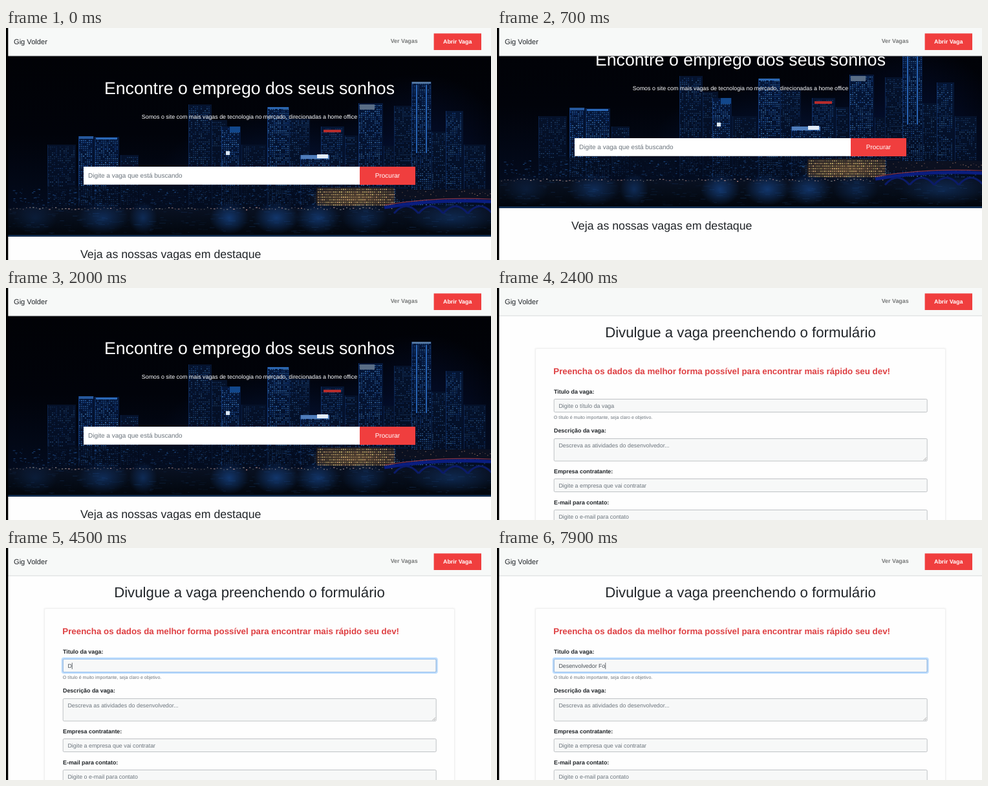
Write an HTML page with a canvas that moves like this. It is 750 px wide and 358 px high and loops after 8 s.

```html
<!DOCTYPE html>
<html lang="pt-BR">
<head>
<meta charset="utf-8">
<title>Vagas</title>
<style>
  html, body { margin: 0; width: 100%; height: 100%; overflow: hidden; background: #fff; }
  #stage { position: relative; width: 750px; height: 358px; overflow: hidden; background: #fefefe; }
  #stage > *, #home > * { position: absolute; left: 0; top: 0; }
  #home { width: 750px; height: 420px; background: #fefefe; }
  #home canvas { left: 3px; top: 43px; }
  svg { display: block; overflow: visible; }
  text {
    font: 8.89px "Liberation Sans", Arial, sans-serif;
    text-rendering: geometricPrecision;
    white-space: pre;
    fill: #212529;
  }
  .b { font-weight: bold; }
  .mid { text-anchor: middle; }
  .white { fill: #fff; }
  .hint { fill: #6c757d; }
  .red { fill: #f03e3e; }
  .field { fill: #f7f8f8; stroke: #bfc2c5; stroke-width: 1; }
</style>
</head>
<body>
<div id="stage">
  <div id="home">
    <canvas id="photo" width="747" height="279"></canvas>
    <svg width="750" height="420">
      <text class="mid white" x="376.5" y="102" style="font-size:26.67px">Encontre o emprego dos seus sonhos</text>
      <text class="mid white" x="376.5" y="140">Somos o site com mais vagas de tecnologia no mercado, direcionadas a home office</text>
      <rect x="120" y="214" width="427" height="27.7" fill="#fff"/>
      <rect class="red" x="547" y="214" width="86" height="28"/>
      <text class="hint" x="127" y="231" style="font-size:10px">Digite a vaga que está buscando</text>
      <text class="mid white" x="590" y="231" style="font-size:10px">Procurar</text>
      <text x="115" y="355.3" style="font-size:17.78px">Veja as nossas vagas em destaque</text>
    </svg>
  </div>

  <svg id="form" width="750" height="358">
    <rect width="750" height="358" fill="#fefefe"/>
    <text class="mid" x="376.5" y="76.3" style="font-size:22.22px">Divulgue a vaga preenchendo o formulário</text>
    <rect x="58.5" y="92.5" width="636" height="300" rx="3" fill="none" stroke="#f8f8f8" stroke-width="2"/>
    <rect x="59.5" y="93.5" width="634" height="300" rx="2" fill="#fefefe" stroke="#efefef"/>
    <text class="b" x="87.3" y="132.8" style="font-size:13.33px;fill:#de3f42">Preencha os dados da melhor forma possível para encontrar mais rápido seu dev!</text>

    <text class="b" x="88" y="163">Titulo da vaga:</text>
    <rect id="ring" x="87" y="170" width="579.5" height="22.8" rx="2.5" fill="none" stroke="#bfdeff" stroke-width="2.6"/>
    <rect class="field" x="88.2" y="171.5" width="577" height="20" rx="1.5"/>
    <rect id="edge" x="88.2" y="171.5" width="577" height="20" rx="1.5" fill="none" stroke="#8fbcec"/>
    <text id="typed" x="95.4" y="184.7"></text>
    <rect id="caret" y="177" width=".8" height="10" fill="#495057"/>
    <text class="hint" x="87.8" y="202" style="font-size:7.11px">O título é muito importante, seja claro e objetivo.</text>

    <text class="b" x="88" y="223.3">Descrição da vaga:</text>
    <rect class="field" x="88.2" y="232.5" width="577" height="34.5" rx="1.5"/>
    <path d="M659.5 266l4.5-4.5M662 266l2-2" stroke="#888" stroke-width=".7"/>
    <text class="hint" x="95.4" y="245.8">Descreva as atividades do desenvolvedor...</text>

    <text class="b" x="88" y="285.7">Empresa contratante:</text>
    <rect class="field" x="88.2" y="294.5" width="577" height="20" rx="1.5"/>
    <text class="hint" x="95.4" y="307.5">Digite a empresa que vai contratar</text>

    <text class="b" x="88" y="333.5">E-mail para contato:</text>
    <rect class="field" x="88.2" y="342.5" width="577" height="20" rx="1.5"/>
    <text class="hint" x="95.4" y="355.5">Digite o e-mail para contato</text>
  </svg>

  <svg id="bar" width="750" height="358">
    <rect width="750" height="43" fill="#f7f9f8"/>
    <rect y="42.4" width="750" height="1" fill="#d9dbdb"/>
    <text x="12" y="25" style="font-size:11.11px">Gig Volder</text>
    <text class="b" x="594.7" y="23.4" style="fill:#777979">Ver Vagas</text>
    <rect class="red" x="661.6" y="8.4" width="73.4" height="25.6"/>
    <text class="b mid white" x="698.2" y="24">Abrir Vaga</text>
    <rect width="3.3" height="358" fill="#000"/>
  </svg>
</div>

<script>
const $ = id => document.getElementById(id);

function paintPhoto() {
  const c = $('photo').getContext('2d');
  let seed = 11;
  const rnd = () => {
    seed = (seed * 16807) % 2147483647;
    return seed / 2147483647;
  };
  const box = (x, y, w, h, fill) => { c.fillStyle = fill; c.fillRect(x, y, w, h); };
  const fade = (y0, y1, ...stops) => {
    const g = c.createLinearGradient(0, y0, 0, y1);
    stops.forEach((s, i) => g.addColorStop(i / (stops.length - 1), s));
    return g;
  };
  const glow = (x, y, rx, ry, rgb, a) => {
    c.save();
    c.translate(x, y);
    c.scale(rx, ry);
    const g = c.createRadialGradient(0, 0, 0, 0, 0, 1);
    g.addColorStop(0, `rgba(${rgb},${a})`);
    g.addColorStop(1, `rgba(${rgb},0)`);
    box(-1, -1, 2, 2, g);
    c.restore();
  };

  c.translate(-3, -43);
  box(3, 43, 747, 279, fade(43, 285, '#010206', '#01030a', '#030b1e'));
  glow(440, 225, 200, 100, '8,40,110', .4);
  glow(640, 200, 140, 130, '8,36,120', .35);

  // x, width, top, brightness
  const towers = [
    [64, 44, 180, .3], [112, 24, 167, .7], [137, 38, 168, .65], [177, 28, 196, .35],
    [206, 70, 243, .15], [282, 36, 118, .4], [318, 24, 142, .3], [364, 38, 180, .3],
    [333, 30, 152, .65], [404, 34, 122, .65], [438, 32, 140, .4], [487, 36, 152, .5],
    [455, 47, 196, .6], [524, 20, 166, .35], [545, 38, 116, .6], [584, 18, 182, .3],
    [600, 28, 120, .35], [627, 31, 83, .6], [658, 22, 160, .35], [680, 27, 128, .5],
    [708, 34, 180, .35]
  ];
  for (const [x, w, top, lit] of towers) {
    box(x, top, w, 280 - top, fade(top, 280, `rgb(5,${12 + lit * 18 | 0},${26 + lit * 50 | 0})`, '#030c20'));
    for (let y = top + 3; y < 274; y += 3) {
      const floor = .5 + rnd() * .6;
      for (let i = x + 1; i < x + w - 2; i += 3) {
        if (rnd() > .35 + lit * .55) continue;
        const v = rnd();
        box(i, y, 2, 1.4, `rgba(${20 + v * 80 | 0},${80 + v * 100 | 0},${180 + v * 65 | 0},${lit * floor})`);
      }
    }
    box(x, top, 1, 275 - top, `rgba(40,110,220,${lit * .6})`);
  }

  // Crowns and signs
  box(113, 167, 22, 4, '#26589c');
  box(139, 169, 33, 3, '#2b69b8');
  box(346, 152, 16, 9, '#12478b');
  box(405, 122, 32, 3, '#2b66b0');
  box(547, 118, 23, 8, '#596d86');
  box(628, 83, 29, 3, '#53769f');
  box(634, 88, 2, 105, '#2864b5');
  box(649, 88, 2, 105, '#2864b5');
  box(491, 157, 27, 4, '#b62c2c');
  box(456, 196, 44, 6, '#4e7cba');
  box(481, 195, 17, 6, '#e4edf8');
  box(340, 190, 6, 6, '#dce9f6');

  // Lit waterfront
  box(64, 244, 420, 31, 'rgba(4,12,30,.6)');
  for (let i = 0; i < 330; i++) {
    const x = 10 + rnd() * 530;
    box(x, 248 + rnd() * 26, 1 + rnd() * 3, 1, `rgba(45,110,190,${.15 + rnd() * .5})`);
  }
  box(480, 246, 120, 28, '#1e1b20');
  for (let y = 248; y < 274; y += 4)
    for (let x = 482; x < 600; x += 3)
      box(x, y, 2, 2.2, `rgba(235,${175 + rnd() * 50 | 0},130,${.15 + rnd() * .55})`);
  glow(540, 262, 75, 18, '230,170,90', .25);
  box(603, 249, 147, 15, '#0b1020');
  for (let x = 604; x < 750; x += 4)
    box(x, 250 + rnd() * 10, 2, 1, `rgba(190,145,115,${rnd() * .6})`);

  // Water with reflections
  box(3, 278, 747, 43, fade(278, 321, '#091122', '#050c18', '#02050b'));
  for (const [x, r, a] of [[45, 35, .2], [150, 40, .4], [212, 22, .4], [345, 30, .55], [418, 35, .55], [482, 34, .5], [555, 35, .3], [690, 70, .35]])
    glow(x, 293, r, 25, '28,88,175', a);
  for (let i = 0; i < 330; i++) {
    const y = 280 + rnd() * 37;
    box(3 + rnd() * 747, y, 2 + rnd() * 10, 1, `rgba(40,95,165,${rnd() * .22})`);
  }
  for (let x = 6; x < 600; x += 5)
    box(x, 276 + rnd() * 4, 1 + rnd() * 2, 1.3, `rgba(${150 + rnd() * 80 | 0},165,160,${.2 + rnd() * .6})`);

  // Bridge
  c.lineWidth = 5;
  c.strokeStyle = '#0a1d80';
  c.beginPath();
  c.moveTo(585, 277);
  c.quadraticCurveTo(665, 263, 750, 268);
  c.stroke();
  c.lineWidth = 1.2;
  c.strokeStyle = '#843449';
  c.beginPath();
  c.moveTo(585, 273);
  c.quadraticCurveTo(665, 260, 750, 264);
  c.stroke();
  for (let x = 600; x < 750; x += 38) {
    c.lineWidth = 3;
    c.strokeStyle = '#0b1b68';
    c.beginPath();
    c.moveTo(x, 286);
    c.quadraticCurveTo(x + 19, 264, x + 38, 286);
    c.stroke();
  }
  box(3, 319.6, 747, 1.8, '#173c69');
}

const LOOP = 8000, STEP = 100, FORM_AT = 2200, FOCUS_AT = 3500;
const scroll = [0, 8, 28, 46, 54, 55, 53, 44, 16, 0];
const hint = 'Digite o título da vaga';
const title = 'Desenvolvedor Fo';
const keys = [4500, 4700, 4900, 5100, 5200, 5400, 5600, 5800, 6000, 6100, 6400, 7000, 7100, 7300, 7600, 7800];
const typed = $('typed'), caret = $('caret');

function render(now) {
  const t = Math.floor(now % LOOP / STEP) * STEP;
  $('home').style.transform = `translateY(${-(scroll[t / STEP] || 0)}px)`;
  $('form').style.visibility = t >= FORM_AT ? 'visible' : 'hidden';

  const focus = Math.max(0, Math.min(1, (t - FOCUS_AT + 80) / 180));
  $('ring').style.opacity = $('edge').style.opacity = focus;

  const n = keys.filter(k => k <= t).length;
  const text = n ? title.slice(0, n) : hint;
  if (typed.textContent !== text) typed.textContent = text;
  typed.style.fill = n ? '#495057' : '#6c757d';
  const on = t >= FOCUS_AT && (t < 4100 || n > 0);
  caret.style.opacity = on ? 1 : 0;
  caret.setAttribute('x', 95.4 + (n ? typed.getComputedTextLength() : 0));
}

paintPhoto();
const start = performance.now();
function tick() {
  render(performance.now() - start);
  requestAnimationFrame(tick);
}
tick();
</script>
</body>
</html>
```
